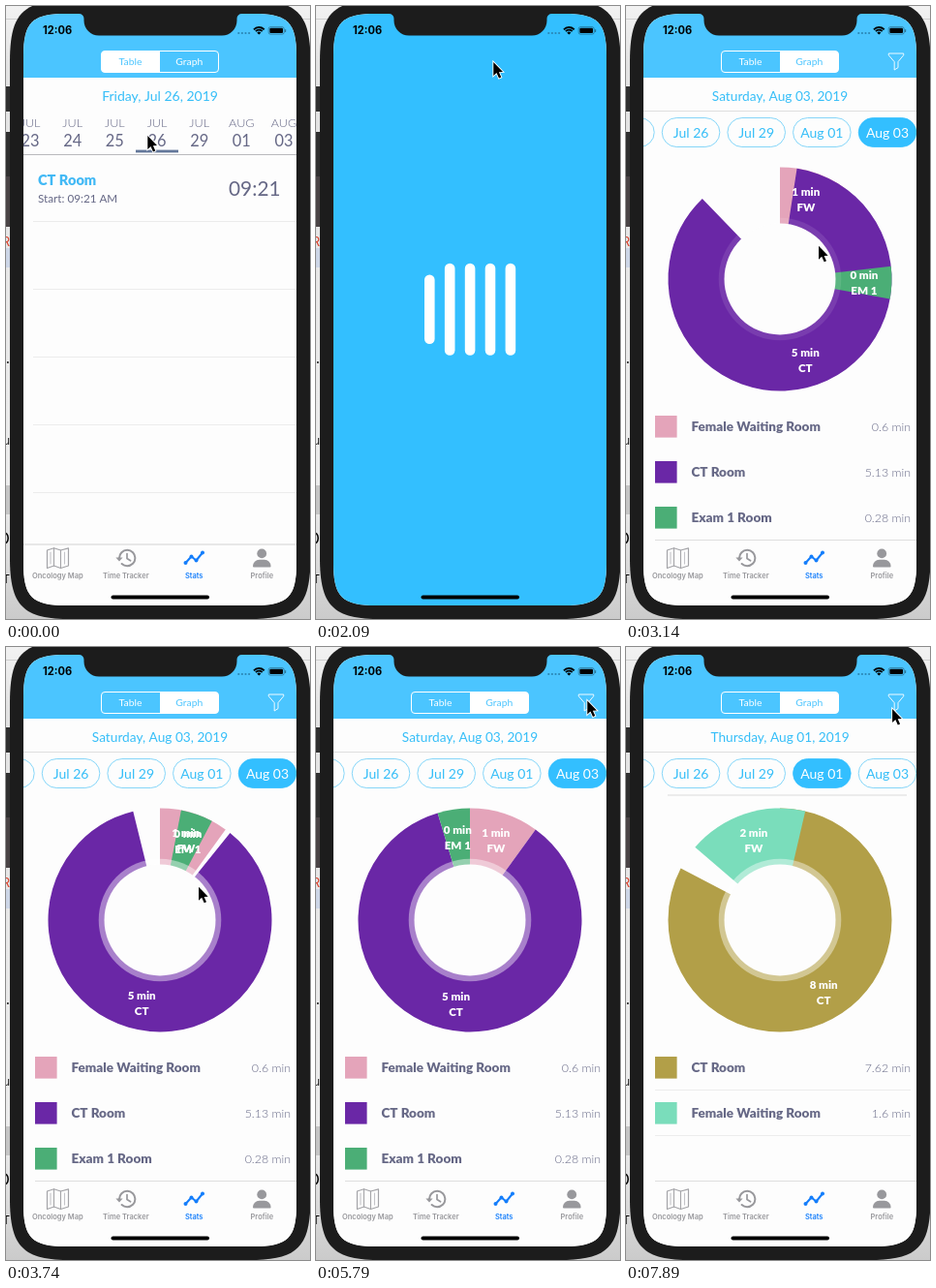
Animation of 314 by 633 pixels, one loop 8 s. Source, as an HTML page with a canvas:

```html
<!DOCTYPE html>
<html lang="en">
<head>
<meta charset="utf-8">
<title>Room time stats</title>
<style>
html, body { margin: 0; width: 100%; height: 100%; overflow: hidden; background: #e6e6e6; }
canvas { display: block; width: 314px; height: 633px; }
</style>
</head>
<body>
<canvas id="stage"></canvas>
<script>
const W = 314, H = 633, LOOP = 8000, STEP = 148.9;
const canvas = document.getElementById('stage');
const ctx = canvas.getContext('2d');
const dpr = window.devicePixelRatio || 1;
canvas.width = W * dpr;
canvas.height = H * dpr;

const SKY = '#4bc5ff', BLUE = '#33bfff', INK = '#666886', PAPER = '#fdfdfd', GREY = '#98989c';
const APP = 'Lato, "Open Sans", sans-serif', SYS = 'Inter, Roboto, sans-serif';

// chart slices: legend name, minutes, short label, colour
const SAT = [
  ['Female Waiting Room', 0.6, 'FW', '#e4a4ba'],
  ['CT Room', 5.13, 'CT', '#6a27a6'],
  ['Exam 1 Room', 0.28, 'EM 1', '#4bae76']
];
const THU = [
  ['CT Room', 7.62, 'CT', '#b29f48'],
  ['Female Waiting Room', 1.6, 'FW', '#7addbb']
];

// pointer stops: time, x, y
const PATH = [
  [0, 146, 133], [1200, 146, 133], [1935, 183, 57], [2090, 183, 57],
  [2830, 198.7, 246.7], [4770, 198.7, 246.7], [5800, 280, 54.5], [6710, 280, 54.5],
  [6990, 211.8, 120], [7440, 211.8, 120], [7890, 274.8, 63], [8000, 274.8, 63]
];

const clamp = v => Math.max(0, Math.min(1, v));

function smooth(v) {
  return v * v * (3 - 2 * v);
}

function backOut(v) {
  const u = v - 1;
  return 1 + u * u * (2.70158 * u + 1.70158);
}

function bezier(x, x1, y1, x2, y2) {
  const at = (s, a, b) => 3 * (1 - s) * (1 - s) * s * a + 3 * (1 - s) * s * s * b + s * s * s;
  let lo = 0, hi = 1;
  for (let i = 0; i < 24; i++) {
    const mid = (lo + hi) / 2;
    if (at(mid, x1, x2) < x) lo = mid; else hi = mid;
  }
  return at(lo, y1, y2);
}

function text(str, x, y, size, color, { weight = 400, align = 'left', font = APP } = {}) {
  ctx.font = `${weight} ${size}px ${font}`;
  ctx.textAlign = align;
  ctx.fillStyle = color;
  ctx.fillText(str, x, y);
}

function mid(str, x, y, size, color, weight) {
  text(str, x, y, size, color, { weight, align: 'center' });
}

function rect(x, y, w, h, color) {
  ctx.fillStyle = color;
  ctx.fillRect(x, y, w, h);
}

function round(x, y, w, h, r, fill, stroke, width) {
  ctx.beginPath();
  ctx.roundRect(x, y, w, h, r);
  paint(fill, stroke, width);
}

// box whose corners ease into the sides, as on the device
function softBox(x, y, w, h, r) {
  const e = r * 1.45, c = r * 0.3, x2 = x + w, y2 = y + h;
  ctx.beginPath();
  ctx.moveTo(x + e, y);
  ctx.lineTo(x2 - e, y);
  ctx.bezierCurveTo(x2 - c, y, x2, y + c, x2, y + e);
  ctx.lineTo(x2, y2 - e);
  ctx.bezierCurveTo(x2, y2 - c, x2 - c, y2, x2 - e, y2);
  ctx.lineTo(x + e, y2);
  ctx.bezierCurveTo(x + c, y2, x, y2 - c, x, y2 - e);
  ctx.lineTo(x, y + e);
  ctx.bezierCurveTo(x, y + c, x + c, y, x + e, y);
  ctx.closePath();
}

function paint(fill, stroke, width = 1) {
  if (fill) { ctx.fillStyle = fill; ctx.fill(); }
  if (stroke) { ctx.strokeStyle = stroke; ctx.lineWidth = width; ctx.stroke(); }
}

function poly(points, fill, stroke, width, open) {
  ctx.beginPath();
  points.forEach(([x, y]) => ctx.lineTo(x, y));
  if (!open) ctx.closePath();
  paint(fill, stroke, width);
}

function circle(x, y, r, fill, stroke, width) {
  ctx.beginPath();
  ctx.arc(x, y, r, 0, Math.PI * 2);
  paint(fill, stroke, width);
}

function backdrop() {
  const g = ctx.createLinearGradient(0, 0, 0, H);
  g.addColorStop(0, '#f2f2f2');
  g.addColorStop(0.1, '#e2e2e2');
  g.addColorStop(0.8, '#ececec');
  g.addColorStop(1, '#cbcbcb');
  rect(0, 0, W, H, g);
  rect(0, 13, W, 1, '#cfcfcf');
  rect(0, 83, 5, 26, '#303030');
  rect(0, 130, 5, 46, '#303030');
  rect(0, 176, 5, 52, '#4a4446');
  rect(0, 250, 5, 20, '#ccd5e6');
  rect(0, 495, 5, 30, '#c4c4c4');
  const edge = { align: 'right', font: SYS };
  text('R', 4, 248, 13, '#d8402c', edge);
  text('.', 4, 369, 15, '#000', edge);
  text('u', 4, 453, 12, '#222', edge);
  text('O', 4, 556, 17, '#000', edge);
  text('T', 4, 596, 12, '#000', edge);
}

function phone() {
  softBox(4, -6, 310.5, 639, 44);
  paint('#1c1c1c');
}

function statusBar() {
  ctx.beginPath();
  ctx.moveTo(72, 7);
  ctx.lineTo(75, 8);
  ctx.arcTo(80.5, 8, 80.5, 14, 5);
  ctx.arcTo(80.5, 30.6, 98, 30.6, 15.5);
  ctx.arcTo(238.5, 30.6, 238.5, 14, 15.5);
  ctx.arcTo(238.5, 8, 244, 8, 5);
  ctx.lineTo(247, 7);
  paint('#1c1c1c');
  text('12:06', 38, 29.3, 11.1, '#000', { weight: 700, font: SYS });
  for (let i = 0; i < 4; i++) circle(240.3 + i * 3.6, 28, 1.1, '#2a86b5');
  ctx.lineCap = 'butt';
  [[7.3, 1.9], [4.6, 1.8]].forEach(([r, w]) => {
    ctx.beginPath();
    ctx.arc(261.3, 29.3, r, -Math.PI * 0.76, -Math.PI * 0.24);
    paint(null, '#000', w);
  });
  ctx.beginPath();
  ctx.moveTo(261.3, 29.6);
  ctx.arc(261.3, 29.3, 2.6, -Math.PI * 0.78, -Math.PI * 0.22);
  paint('#000');
  round(271.2, 21.6, 16, 7.6, 2, null, 'rgba(0,0,0,.4)', 0.8);
  round(272.4, 22.8, 13.6, 5.2, 1, '#000');
  round(288, 24, 1.2, 3, 0.6, 'rgba(0,0,0,.4)');
}

function header(graph, pressed) {
  rect(18, 8, 282, 66, SKY);
  if (pressed) rect(159, 46.5, 60.5, 22, 'rgba(255,255,255,.15)');
  round(98.5, 46.5, 121, 22, 3.5, null, '#fff');
  round(graph ? 159 : 98.5, 46.5, 60.5, 22, graph ? [0, 3.5, 3.5, 0] : [3.5, 0, 0, 3.5], '#fff');
  mid('Table', 128.5, 61.2, 10.4, graph ? '#fff' : SKY);
  mid('Graph', 189.3, 61.2, 10.4, graph ? SKY : pressed ? 'rgba(255,255,255,.55)' : '#fff');
  if (!graph) return;
  ctx.lineJoin = 'round';
  poly([[271.3, 49], [286.7, 49], [286.7, 50.8], [281, 57.6], [281, 63.6], [277.2, 66], [277.2, 57.6], [271.3, 50.8]], null, '#fff', 0.9);
}

function tabBar() {
  rect(18, 556, 282, 63, PAPER);
  ctx.lineJoin = 'round';
  ctx.lineCap = 'round';
  // folded map
  poly([[42.5, 562], [49.5, 559.8], [56.5, 562], [64.5, 559.8], [64.5, 578], [56.5, 580.5], [49.5, 578], [42.5, 580.5]], null, '#a4a4a8', 1.2);
  poly([[49.5, 559.8], [49.5, 578]], null, '#a4a4a8', 1.1);
  poly([[56.5, 562], [56.5, 580.5]], null, '#a4a4a8', 1.1);
  poly([[46, 564], [46, 576]], null, '#c4c4c8', 1.1);
  poly([[60.5, 564], [60.5, 576]], null, '#c4c4c8', 1.1);
  // clock with back arrow
  ctx.beginPath();
  ctx.arc(125.2, 570, 8.2, -Math.PI, Math.PI * 0.74);
  paint(null, GREY, 2);
  poly([[113.4, 569.4], [120.6, 569.4], [117, 573.6]], GREY);
  poly([[125, 565.6], [125, 570.6], [128.6, 572.8]], null, GREY, 1.7, true);
  // trend line
  const trend = [[185.5, 575], [191.5, 568.5], [196.5, 572.5], [203, 564.5]];
  poly(trend, null, '#157efb', 2.1, true);
  trend.forEach(([x, y]) => circle(x, y, 2, '#157efb'));
  // person
  circle(264.2, 565.4, 4.9, GREY);
  round(255, 571.8, 18.6, 7.6, [7, 7, 1, 1], GREY);

  [['Oncology Map', 53.3], ['Time Tracker', 123.8], ['Stats', 194.2], ['Profile', 264.3]].forEach(([s, x], i) =>
    text(s, x, 591, 7.5, i === 2 ? '#157efb' : GREY, { weight: 600, align: 'center', font: SYS }));
}

function table(t) {
  header(false, t > 1900);
  mid('Friday, Jul 26, 2019', 159, 98, 14, '#35bef8');
  const shift = -3 * (1 - smooth(clamp(t / 600)));
  ['JUL 23', 'JUL 24', 'JUL 25', 'JUL 26', 'JUL 29', 'AUG 01', 'AUG 03'].forEach((day, i) => {
    const x = 159 + (i - 3) * 43.65 + shift;
    const [month, num] = day.split(' ');
    mid(month, x, 125, 12.6, INK, 300);
    mid(num, x, 144.8, 16.4, INK);
  });
  rect(137 + shift, 148.6, 44, 2.8, '#63779a');
  rect(18, 153, 282, 1, '#b9b9bd');
  text('CT Room', 33, 184.6, 14.6, '#42b9f5', { weight: 900 });
  text('Start: 09:21 AM', 33, 203.2, 11.7, INK);
  text('09:21', 283.5, 196, 20.8, INK, { align: 'right' });
  for (let i = 0; i < 5; i++) rect(28, 222 + i * 70, 272, 1, '#ececec');
  tabBar();
  rect(18, 555.5, 282, 1, '#d4d4d4');
}

function pie(data, phase) {
  const cx = 159, cy = 282, R = 115.5, rad = Math.PI / 180;
  const total = data.reduce((sum, d) => sum + d[1], 0);
  const labels = [];
  let start = 0;
  data.forEach(([, value, tag, color]) => {
    const sweep = value / total * 360;
    ctx.beginPath();
    ctx.moveTo(cx, cy);
    ctx.arc(cx, cy, R, (start - 90) * rad, (start + sweep - 90) * rad);
    paint(color);
    labels.push([value, tag, (start + sweep / 2) * rad]);
    start += sweep * phase;
  });
  circle(cx, cy, 63.3, `rgba(255,255,255,${0.41 * clamp(phase)})`);
  circle(cx, cy, 57.5, PAPER);
  labels.forEach(([value, tag, a]) => {
    const x = cx + 87 * Math.sin(a), y = cy - 87 * Math.cos(a);
    mid(Math.round(value) + ' min', x, y - 3.2, 11.6, '#fff', 900);
    mid(tag, x, y + 12.8, 11.6, '#fff', 900);
  });
}

function graph(t) {
  const thu = t > 7280, fresh = t > 7400;
  const data = fresh ? THU : SAT;
  header(true);
  mid(thu ? 'Thursday, Aug 01, 2019' : 'Saturday, Aug 03, 2019', 159, 98, 13.7, '#35bef8');
  rect(18, 108, 282, 1, '#dedede');
  ['', 'Jul 26', 'Jul 29', 'Aug 01', 'Aug 03'].forEach((day, i) => {
    const x = -30.8 + i * 67.65, on = i === (thu ? 3 : 4);
    round(x + 0.4, 115.5, 59.6, 30, 15, on ? BLUE : PAPER, on ? BLUE : '#67ccf8', 0.8);
    mid(day, x + 30.2, 135.6, 14, on ? '#fff' : '#35bef8');
  });
  if (fresh) rect(43, 152.5, 247, 1, '#dcdcdc');
  pie(data, backOut(clamp((t - (fresh ? 7306 : 3048.7)) / 1400)));
  data.forEach(([name, value, , color], i) => {
    const y = 423 + i * 47;
    rect(30, y, 22.6, 22.6, color);
    text(name, 67.5, y + 15.6, 13.5, INK, { weight: 900 });
    text(value + ' min', 294, y + 16, 12.4, INK, { weight: 300, align: 'right' });
    if (fresh) rect(30, y + 34, 264, 1, '#ececec');
  });
  tabBar();
  rect(30, 551, 270, 1, '#dedede');
}

function loader(t) {
  rect(18, 8, 282, 611, BLUE);
  const ease = x => bezier(x, 0.2, 0.68, 0.18, 1.08);
  for (let i = 0; i < 5; i++) {
    const s = Math.max(0, (t - 1928) / 1000 - 0.1 * (i + 1)) % 1;
    const k = s < 0.5 ? 1 - 0.6 * ease(s * 2) : 0.4 + 0.6 * ease(s * 2 - 1);
    const h = 95 * k;
    round(112 + i * 20.9, 313.2 - h / 2, 10.6, h, 5.3, '#fff');
  }
}

function pointer(t) {
  const i = Math.max(1, PATH.findIndex(p => p[0] >= t));
  const [t0, x0, y0] = PATH[i - 1], [t1, x1, y1] = PATH[i];
  const k = smooth(clamp((t - t0) / (t1 - t0)));
  ctx.save();
  ctx.translate(x0 + (x1 - x0) * k, y0 + (y1 - y0) * k);
  ctx.lineJoin = 'miter';
  const arrow = [[0.3, 1], [0.3, 15], [3.5, 12], [6, 17.6], [8.3, 16.6], [5.9, 11.2], [10, 11]];
  poly(arrow, null, '#fff', 1.8);
  poly(arrow, '#000');
  ctx.restore();
}

function draw(t) {
  ctx.setTransform(dpr, 0, 0, dpr, 0, 0);
  ctx.textBaseline = 'alphabetic';
  backdrop();
  phone();
  ctx.save();
  softBox(18, 8, 282, 611, 30);
  ctx.clip();
  rect(18, 8, 282, 611, PAPER);
  if (t < 2070) table(t);
  else if (t < 3100) loader(t);
  else graph(t);
  ctx.restore();
  statusBar();
  round(108.5, 608.4, 101.5, 4, 2, '#000');
  pointer(t);
}

function frame(now) {
  const t = now % LOOP;
  draw(Math.floor((t + 20) / STEP) * STEP);
  requestAnimationFrame(frame);
}
requestAnimationFrame(frame);
</script>
</body>
</html>
```
